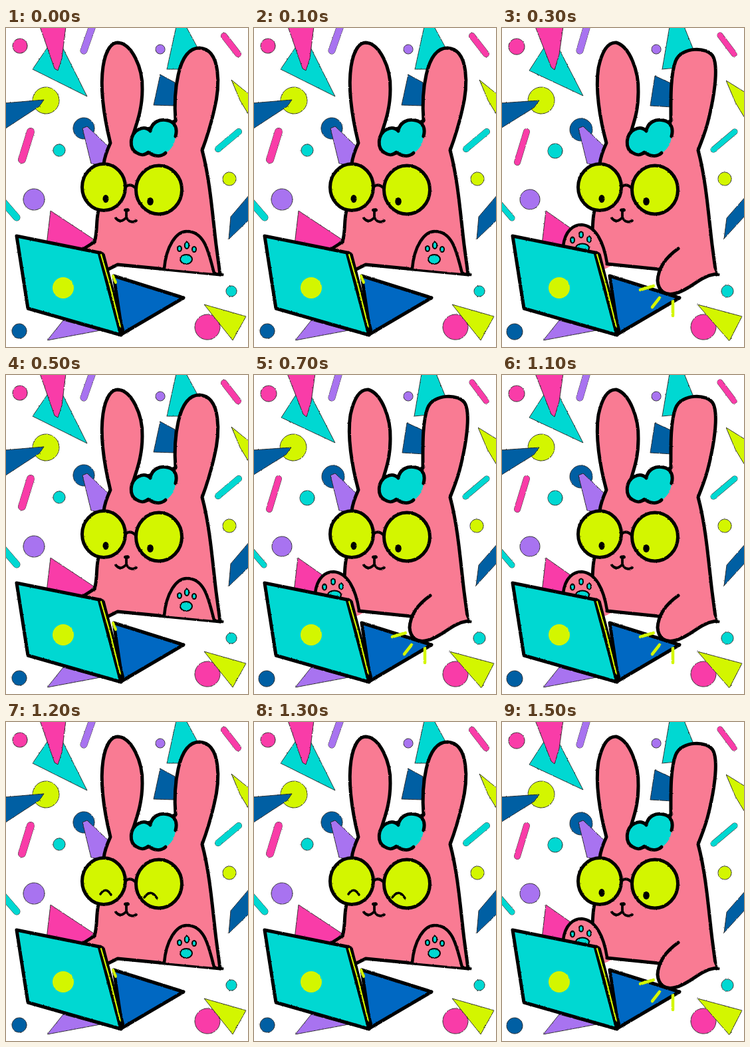
An HTML page that plays this animation: 364 px wide and 480 px high, repeating every 1600 ms.

```html
<!DOCTYPE html>
<html lang="en">
<head>
<meta charset="utf-8">
<title>Rabbit at a laptop</title>
<style>
html, body { margin: 0; width: 100%; height: 100%; overflow: hidden; background: #fff; }
svg { display: block; width: 100vw; height: 100vh; }
</style>
</head>
<body>
<svg id="stage" viewBox="0 0 364 480">
  <defs>
    <filter id="rough" filterUnits="userSpaceOnUse" x="-10" y="-10" width="384" height="500" color-interpolation-filters="sRGB">
      <feTurbulence type="fractalNoise" baseFrequency=".45" numOctaves="2" seed="4"/>
      <feDisplacementMap in="SourceGraphic" scale="2" xChannelSelector="R" yChannelSelector="G"/>
    </filter>
  </defs>
</svg>
<script>
const svg = document.getElementById('stage');
const SKIN = '#f97b93', CYAN = '#00d8d2', PINK = '#f93ca8', PURPLE = '#a873f0',
      NAVY = '#005fa3', BLUE = '#0068c2', LIME = '#d3f600', INK = '#000';
const HOLD = 200, LOOP = 1600, BLINK = 6;

function add(parent, tag, attrs) {
  const el = document.createElementNS('http://www.w3.org/2000/svg', tag);
  for (const key in attrs) el.setAttribute(key, attrs[key]);
  parent.appendChild(el);
  return el;
}
const group = parent => add(parent, 'g', {
  'stroke-linecap': 'round', 'stroke-linejoin': 'round'
});
const shape = (g, d, fill = 'none', width = 5, stroke = INK) =>
  add(g, 'path', { d, fill, stroke, 'stroke-width': width });
const oval = (g, cx, cy, rx, ry, fill, width = 0) =>
  add(g, 'ellipse', { cx, cy, rx, ry, fill, stroke: INK, 'stroke-width': width });

// Confetti pieces carry a thin speckled edge.
const edge = { stroke: '#222', 'stroke-width': 1, 'stroke-dasharray': '1.4 1' };
const dot = (g, cx, cy, r, fill) => add(g, 'circle', { cx, cy, r, fill, ...edge });
const poly = (g, points, fill) => add(g, 'polygon', { points, fill, ...edge });
function pill(g, d, width, color) {
  shape(g, d, 'none', width + 1, '#444');
  shape(g, d, 'none', width, color);
}

function confetti(g, up) {
  const pick = (a, b) => up ? a : b;
  dot(g, pick(21, 22), pick(27, 28), pick(11, 12), PINK);
  poly(g, pick('70,18 40,62 122,103 84,27', '68,22 41,64 122,102 84,28'), CYAN);
  poly(g, pick('51,-2 90,-2 84,46 78,64 73,61', '50,-2 92,-2 86,40 79,63 74,59'), PINK);
  pill(g, pick('M129 0L117 34', 'M127 0L117 34'), pick(10, 10), PURPLE);
  dot(g, 232, 32, 7, PURPLE);
  poly(g, pick('256,-2 271,-2 290,33 262,62 242,62', '252,-2 274,-2 289,35 262,60 241,62'), CYAN);
  pill(g, pick('M328 12L349 39', 'M328 11L349 39'), pick(9, 8), PINK);
  poly(g, pick('339,78 366,100 366,132 352,109', '337,79 366,97 366,137 351,112'), LIME);
  poly(g, pick('232,70 254,82 254,117 222,116', '230,72 256,84 256,119 223,117'), NAVY);
  dot(g, pick(60, 59), 109, 20, LIME);
  poly(g, pick('-2,113 57,108 50,118 -2,152', '-2,113 56,109 48,120 -2,151'), NAVY);
  pill(g, pick('M37 156L24 198', 'M37 156L23 202'), pick(11, 9), PINK);
  dot(g, 80, pick(184, 185), pick(9, 11), CYAN);
  dot(g, pick(117, 119), pick(151, 153), pick(16, 17), NAVY);
  poly(g, '115,151 122,148 158,182 150,208 128,204', PURPLE);
  pill(g, pick('M319 182L350 156', 'M318 183L350 156'), pick(9, 8), CYAN);
  dot(g, pick(336, 335), 227, 10, LIME);
  poly(g, pick('366,251 366,288 335,318 338,284', '366,254 366,282 334,317 338,286'), NAVY);
  dot(g, 42, 258, pick(16, 15), PURPLE);
  pill(g, pick('M-3 263L16 285', 'M-3 265L15 286'), pick(10, 8), CYAN);
  poly(g, pick('67,275 132,318 115,336 61,326', '66,275 130,320 115,336 60,326'), PINK);
  dot(g, 339, 396, pick(8, 9), CYAN);
  dot(g, 303, 450, 19, PINK);
  poly(g, pick('298,416 361,434 341,470', '294,416 361,434 342,471'), LIME);
  dot(g, pick(20, 19), pick(456, 457), pick(11, 12), NAVY);
  poly(g, '86,440 62,470 142,455', PURPLE);
}

function body(g, up) {
  const leftEar = up
    ? 'C148 136 141 92 146 58C150 32 159 22 168 22C189 23 206 60 205 92C205 120 198 140 192 158'
    : 'C147 136 140 92 145 60C151 32 160 21 172 22C192 28 206 65 205 96C205 126 198 142 193 160';
  const rightEar = up
    ? 'L255 140C252 100 257 30 291 30C324 32 322 88 313 124C307 150 301 168 295 184'
    : 'L254 140C254 108 253 72 261 50C269 28 310 27 318 44C326 62 318 108 311 136C306 158 300 170 295 184';
  const outline = 'M133 322C138 306 135 292 139 275L147 205C148 194 152 184 157 173' +
    leftEar + rightEar + 'C307 228 311 286 316 326L322 371';
  shape(g, outline + 'L168 356L152 364L115 334Z', SKIN, 0);
  shape(g, outline + 'L325 371');
  if (up) {
    shape(g, 'M133 322L114 334M322 371L168 356L150 365');
    shape(g, 'M238 362C241 328 256 306 272 306C299 306 305 338 313 369', SKIN, 4.5);
    oval(g, 271, 348, 9, 7, CYAN, 2);
    oval(g, 261, 332, 3, 4, CYAN, 2);
    oval(g, 272, 327, 3.2, 5, CYAN, 2);
    oval(g, 283, 333, 3, 4, CYAN, 2);
  } else {
    shape(g, 'M158 355L236 363');
    shape(g, 'M92 328C95 305 107 296 120 296C141 298 153 322 158 354', SKIN, 4.5);
    oval(g, 121, 331, 10, 6.5, CYAN, 2);
    [[106, 319], [119, 311], [131, 318]].forEach(
      ([x, y]) => oval(g, x, y, 3, 4.5, CYAN, 2));
  }
}

function face(g, up) {
  // The hair outline stays open on its right side.
  const hair = 'M240 188C234 194 223 194 214 187C208 192 203 192 197 188' +
    'C184 183 186 158 199 153C206 149 212 150 217 155C219 142 231 136 243 139C255 141 258 152 255 163';
  shape(g, hair + 'C254 174 249 183 240 188Z', CYAN, 0);
  shape(g, hair);
  oval(g, 147, 239.5, 32.5, 35, LIME, 5);
  oval(g, 230, 243.5, 34.5, 36.5, LIME, 5);
  shape(g, 'M180 239Q187 233 195 241', 'none', 4);
  oval(g, 181.5, 274, 4.5, 2.8, INK);
  shape(g, 'M181 274V285M165 286Q172 295 181 285Q186 295 196 290', 'none', 3.8);
  const open = group(g), shut = group(g);
  oval(open, 150, 257, 4.5, 6, INK);
  oval(open, 217, 261, 4.8, 6, INK);
  shape(shut, 'M142 259Q150 247 158 260M208 264Q218 250 227 265', 'none', 3.5);
  return { open, shut };
}

function laptop(g, up) {
  shape(g, 'M162 373L267 406L175 460Z', BLUE);
  shape(g, 'M142 337L147 340L177 456L174 462Z', INK, 3);
  shape(g, 'M16 313L140 338L173 462L33 422Z', CYAN);
  shape(g, 'M143 341L156 386L172 450', 'none', 2.2, LIME);
  oval(g, 86, 391, 16, 16, LIME);
  if (up) {
    shape(g, 'M161 373L165 383', 'none', 4, LIME);
    return;
  }
  const arm = 'M265 332C245 346 235 362 234 380C235 396 246 404 262 399C286 392 296 374 322 370';
  shape(g, arm + 'L306 332Z', SKIN, 0);
  shape(g, arm);
  shape(g, 'M208 394L228 388M237 406L226 420M257 411L257 433', 'none', 4.5, LIME);
}

function makePose(up) {
  const g = group(svg);
  g.setAttribute('filter', 'url(#rough)');
  confetti(g, up);
  body(g, up);
  const eyes = face(g, up);
  laptop(g, up);
  return { g, eyes };
}

const poses = [makePose(true), makePose(false)];
const show = (el, on) => el.setAttribute('display', on ? 'inline' : 'none');

function draw(ms) {
  const beat = Math.floor(ms % LOOP / HOLD);
  poses.forEach(({ g, eyes }, i) => {
    show(g, beat % 2 === i);
    show(eyes.open, beat !== BLINK);
    show(eyes.shut, beat === BLINK);
  });
}

const start = performance.now();
function tick() {
  draw(performance.now() - start);
  requestAnimationFrame(tick);
}
draw(0);
requestAnimationFrame(tick);
</script>
</body>
</html>
```
